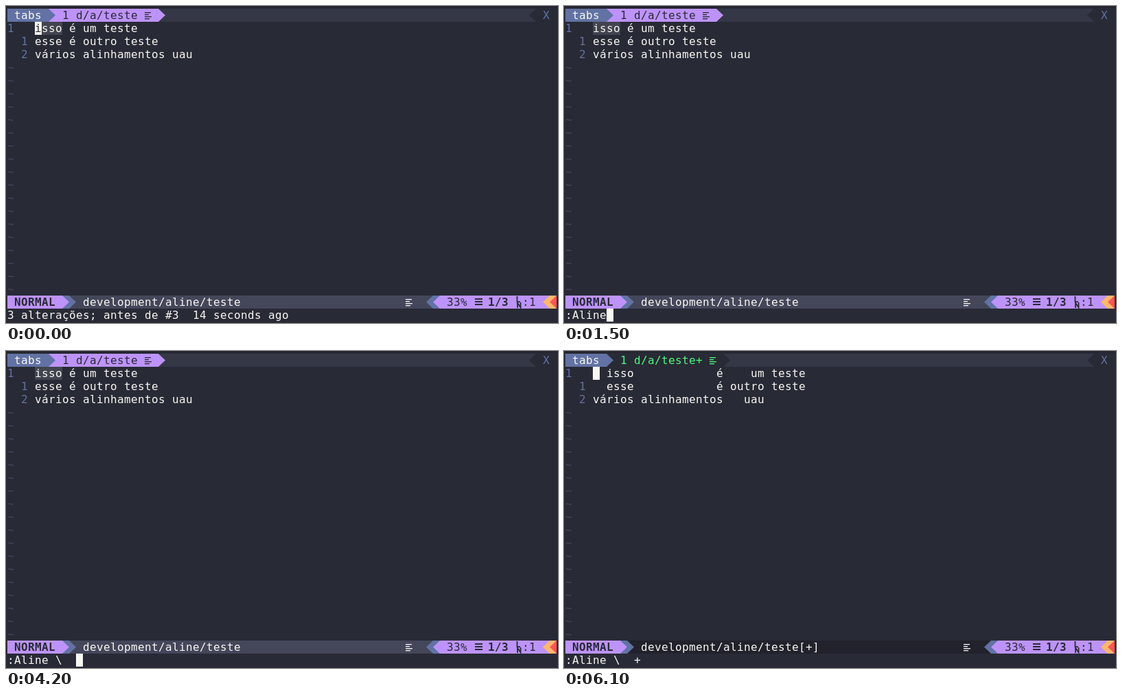
Animation of 804 by 462 pixels, one loop 8 s. Source, as an HTML page:

```html
<!DOCTYPE html>
<html lang="pt">
<head>
<meta charset="utf-8">
<title>Terminal</title>
<style>
html, body { margin: 0; width: 100%; height: 100%; overflow: hidden; background: #282a36; }
svg { display: block; width: 804px; height: 462px; }
text { font: 16px "DejaVu Sans Mono", monospace; white-space: pre; }
.b { font-weight: bold; }
</style>
</head>
<body>
<svg id="stage" viewBox="0 0 804 462"></svg>
<script>
const LOOP = 8000, CW = 10, CH = 19;
const C = {
  bg: '#282a36', dark: '#21222c', bar: '#343746', sel: '#424450', line: '#44475a',
  fg: '#f8f8f2', blue: '#6272a4', purple: '#bd93f9', green: '#50fa7b',
  orange: '#ffb86c', red: '#ff5555'
};
const COMMAND = ':Aline \\  +';
const KEYS = [400, 700, 1100, 1300, 1400, 1500, 2400, 2700, 2900, 4200, 4600];
const RUN = 5800, CLEAR = 6100;

const X = c => 2 + c * CW;
const Y = r => 4 + r * CH;

const rect = (x, y, w, h, fill) =>
  `<rect x="${x}" y="${y}" width="${w}" height="${h}" fill="${fill}"/>`;
const cells = (c, r, n, fill) => rect(X(c), Y(r), n * CW, CH, fill);

// Text on the terminal grid, one cell per character
function text(c, r, str, fill = C.fg, cls = '') {
  const xs = [...str].map((_, i) => X(c + i)).join(' ');
  return `<text class="${cls}" x="${xs}" y="${Y(r) + 15}" fill="${fill}">${str}</text>`;
}

// Powerline separators
const right = (c, r, fill) =>
  `<path d="M${X(c)} ${Y(r)}l10 9.5l-10 9.5z" fill="${fill}"/>`;
const left = (c, r, fill) =>
  `<path d="M${X(c + 1)} ${Y(r)}l-10 9.5l10 9.5z" fill="${fill}"/>`;

const fileIcon = (c, r, fill) =>
  [9, 6, 10, 7].map((w, i) => rect(X(c), Y(r) + 5 + i * 3, w, 1.3, fill)).join('');
const menuIcon = (c, r, fill) =>
  [0, 1, 2].map(i => rect(X(c) + 1, Y(r) + 4 + i * 4, 11, 2, fill)).join('');
const lineIcon = (c, r, fill) =>
  `<path d="M${X(c) + 2.5} ${Y(r) + 1}v8.2h4.5M${X(c) + 3} ${Y(r) + 18}v-7.5l4.5 7v-7.5"
    fill="none" stroke="${fill}" stroke-width="1.8"/>`;

function tabLine(done) {
  const fill = done ? C.bg : C.purple, ink = done ? C.green : C.bg;
  const name = '1 d/a/teste' + (done ? '+' : '');
  const end = 11 + name.length;
  return cells(0, 0, 80, C.bar)
    + cells(0, 0, 6, C.blue) + text(1, 0, 'tabs')
    + cells(6, 0, end - 6, fill) + right(6, 0, C.blue)
    + text(8, 0, name, ink) + fileIcon(end - 2, 0, ink) + right(end, 0, fill)
    + left(76, 0, C.bg) + cells(77, 0, 3, C.bg) + text(78, 0, 'X', C.blue);
}

function statusLine(done) {
  const r = 22;
  return cells(0, r, 80, done ? C.dark : C.line)
    + cells(0, r, 8, C.purple) + text(1, r, 'NORMAL', C.bg, 'b')
    + cells(8, r, 1, C.blue) + right(8, r, C.purple) + right(9, r, C.blue)
    + text(11, r, 'development/aline/teste' + (done ? '[+]' : ''))
    + fileIcon(58, r, C.fg)
    + left(61, r, C.blue) + cells(62, r, 1, C.blue) + left(62, r, C.purple)
    + cells(63, r, 16, C.purple) + text(64, r, '33%', C.bg)
    + menuIcon(68, r, C.bg) + text(70, r, '1/3', C.bg, 'b')
    + lineIcon(74, r, C.bg) + text(75, r, ':1', C.bg)
    + left(78, r, C.orange) + cells(79, r, 1, C.orange) + left(79, r, C.red);
}

function buffer(done, marked) {
  const lines = done
    ? ['  isso            é    um teste', '  esse            é outro teste', 'vários alinhamentos   uau']
    : ['isso é um teste', 'esse é outro teste', 'vários alinhamentos uau'];
  let out = marked ? cells(4, 1, 4, C.sel) : '';
  out += text(0, 1, '1', C.blue) + text(2, 2, '1', C.blue) + text(2, 3, '2', C.blue);
  lines.forEach((s, i) => out += text(4, i + 1, s));
  for (let r = 4; r < 22; r++) out += text(0, r, '~', C.line);
  return out;
}

function scene(t) {
  const typed = KEYS.filter(k => t >= k).length;
  const done = t >= RUN;
  let out = rect(0, 0, 804, 462, C.bg) + rect(0, 1, 804, 1, C.dark)
    + tabLine(done) + buffer(done, t < CLEAR) + statusLine(done);
  out += text(0, 23, typed ? COMMAND.slice(0, typed) : '3 alterações; antes de #3  14 seconds ago');
  if (typed && !done) return out + cells(typed, 23, 1, C.fg);
  return out + cells(4, 1, 1, C.fg) + (done ? '' : text(4, 1, 'i', C.bg));
}

const stage = document.getElementById('stage');
let shown = '';
function draw(now) {
  const next = scene(now % LOOP);
  if (next !== shown) stage.innerHTML = shown = next;
}

const start = performance.now();
function tick() {
  draw(performance.now() - start);
  requestAnimationFrame(tick);
}
tick();
</script>
</body>
</html>
```
